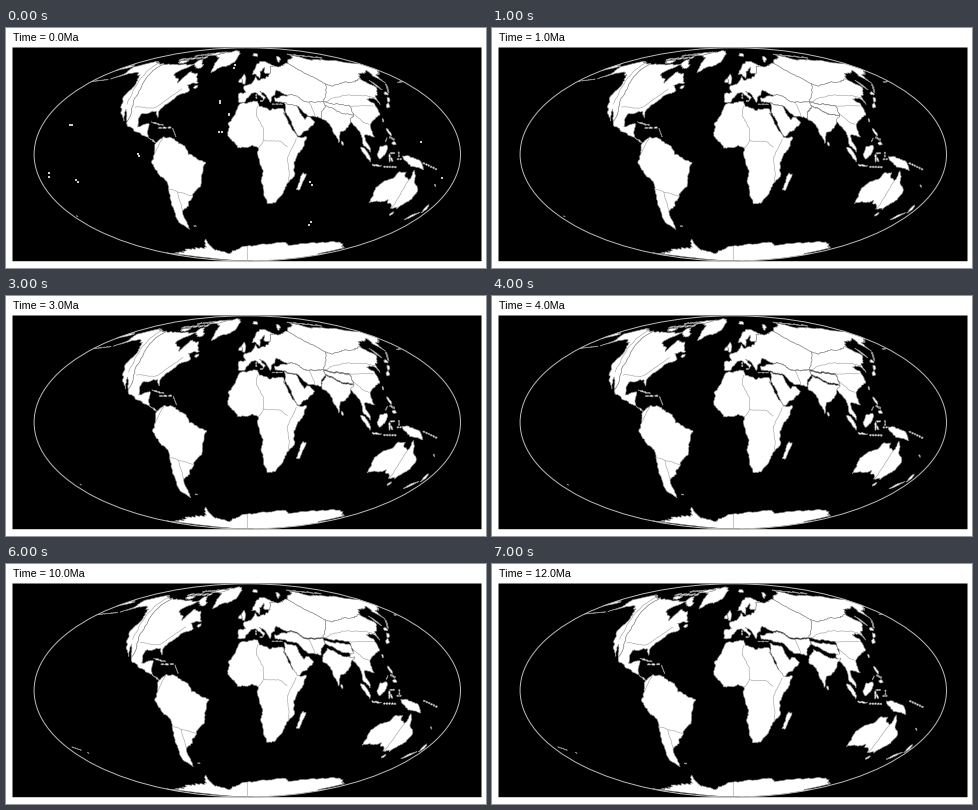
These frames come from a looping animation (480 by 240 pixels, 8000 ms). A matplotlib script:

```python
import numpy as np
import matplotlib.pyplot as plt
from matplotlib.animation import FuncAnimation
from matplotlib.collections import LineCollection, PolyCollection
from matplotlib.patches import Ellipse, Rectangle

AGES = [0, 1, 2, 3, 4, 5, 10, 12]
CX, CY, RX, RY = 241.3, 126.4, 213.2, 106.6
rng = np.random.default_rng(4)

# Plate motion: reference lon, lat, then drift east and north (deg/Ma)
NAM = (-95, 45, -0.40, 0.02)
GRN = (-42, 72, -0.12, 0.02)
CAR = (-75, 18, -0.20, 0.03)
SAM = (-60, -15, -0.27, 0.10)
AFR = (20, 5, 0.02, 0.20)
ARA = (45, 23, 0.13, 0.28)
EUR = (60, 50, 0.03, 0.0)
IRN = (50, 36, 0.04, 0.08)
TIB = (86, 32, 0.06, 0.20)
IND = (78, 20, 0.08, 0.50)
SEA = (112, 0, 0.02, 0.05)
PHI = (123, 12, -0.05, 0.12)
AUS = (134, -25, 0.10, 0.52)
ZEA = (170, -44, -0.10, 0.25)
PAC = (-176, -44, -0.75, 0.10)
FIX = (0, 0, 0, 0)

theta = np.linspace(-np.pi / 2, np.pi / 2, 4001)
theta_lat = np.degrees(np.arcsin(np.clip((2 * theta + np.sin(2 * theta)) / np.pi, -1, 1)))


def sphere(lon, lat):
    lon, lat = np.radians(lon), np.radians(lat)
    return np.stack([np.cos(lat) * np.cos(lon), np.cos(lat) * np.sin(lon), np.sin(lat)], -1)


def spin_vector(plate):
    lon, lat, east, north = plate
    r = sphere(lon, lat)
    e = sphere(lon + 90, 0)
    return np.cross(r, east * e + north * np.cross(r, e))


def reconstruct(pts, plate, age):
    """Rotate lon/lat points back in time, keeping longitudes continuous."""
    p = sphere(pts[:, 0], pts[:, 1])
    w = -np.radians(spin_vector(plate)) * age
    ang = np.linalg.norm(w)
    if ang > 0:
        k = w / ang
        p = (p * np.cos(ang) + np.cross(k, p) * np.sin(ang)
             + np.outer(p @ k, k) * (1 - np.cos(ang)))
    lon = np.unwrap(np.degrees(np.arctan2(p[:, 1], p[:, 0])), period=360)
    lon -= 360 * np.round(lon.mean() / 360)
    return lon, np.degrees(np.arcsin(np.clip(p[:, 2], -1, 1)))


def mollweide(lon, lat):
    t = np.interp(lat, theta_lat, theta)
    return np.column_stack([CX + RX * lon / 180 * np.cos(t), CY - RY * np.sin(t)])


def project(pts, plate, age):
    """Map outline, with a second copy for what crosses the date line."""
    lon, lat = reconstruct(pts, plate, age)
    out = [mollweide(lon, lat)]
    for turn in (-360, 360):
        if lon.min() < turn + 180 and lon.max() > turn - 180:
            out.append(mollweide(lon - turn, lat))
    return out


def roughen(pts, levels, amp):
    """Midpoint displacement that depends on place only, so shared edges agree."""
    for _ in range(levels):
        a, b = pts[:-1], pts[1:]
        mid = (a + b) / 2
        size = np.minimum(np.hypot(*(b - a).T), 5) * amp
        x, y = mid.T
        mid = mid + np.column_stack([np.sin(9.1 * x + 5.7 * y), np.sin(7.3 * x - 8.3 * y)]) * size[:, None]
        full = np.empty((len(pts) + len(mid), 2))
        full[::2], full[1::2] = pts, mid
        pts = full
    pts[:, 1] = np.clip(pts[:, 1], -89.9, 89.9)
    return pts


lands, seams = [], []


def land(plate, *coast, since=0, levels=4):
    pts = np.reshape(coast, (-1, 2)).astype(float)
    lands.append((roughen(np.vstack([pts, pts[:1]]), levels, 0.14), plate, since))


def seam(plate, *line):
    seams.append((roughen(np.reshape(line, (-1, 2)).astype(float), 3, 0.08), plate))


def isles(plate, lon0, lat0, lon1, lat1, width, n=1, since=0):
    """A chain of n ragged islands between two points."""
    squash = np.array([np.cos(np.radians((lat0 + lat1) / 2)), 1])
    start, end = np.array([lon0, lat0]) * squash, np.array([lon1, lat1]) * squash
    step = (end - start) / n
    along = step / np.hypot(*step)
    across = np.array([-along[1], along[0]])
    t = np.linspace(0, 2 * np.pi, 10, endpoint=False)
    for k in range(n):
        r = rng.uniform(0.75, 1.2, (10, 1))
        ring = (np.outer(np.cos(t), step * (0.5 if n == 1 else 0.4))
                + np.outer(np.sin(t), across * width)) * r
        land(plate, *((start + step * (k + 0.5) + ring) / squash).ravel(), since=since, levels=2)


# Eurasia
land(EUR, -9, 37, -9, 43, -1.5, 44, -4, 48.5, 8, 54, 10, 57, 12, 54, 21, 55, 30, 60, 34, 66,
     44, 66, 66, 69, 80, 57, 88, 51, 74, 37, 54, 38, 48, 42, 41, 42, 31, 46, 28, 42, 24, 40,
     22.5, 36.5, 19, 42, 13, 45, 18, 40, 16, 38, 9, 44, 3, 42, -2, 37)
land(EUR, 30, 60, 22, 60.5, 25, 65.5, 17, 61.5, 15, 55.5, 11, 59, 6, 59, 15, 68.5, 27, 71, 41, 67, 34, 66)
land(EUR, 66, 69, 72, 72, 104, 77.5, 113, 73.5, 140, 72.5, 180, 69, 190, 66, 170, 60, 162, 58,
     157, 51.5, 156, 57.5, 163, 62, 143, 59, 135, 54.7, 97, 50, 88, 51, 80, 57)
land(EUR, 88, 51, 97, 50, 135, 54.7, 140, 48, 128, 39.5, 127, 35, 125, 39.5, 118, 39, 122, 36,
     121, 28, 108, 20.5, 109, 12, 100.5, 13, 104, 1.5, 98, 8, 97, 16, 91.5, 22.5, 97, 28,
     97, 34, 74, 37)
land(IRN, 27, 37, 36, 36.5, 46, 34.5, 55, 26.7, 66.5, 25, 74, 34.5, 74, 37, 54, 38, 48, 42,
     41, 42, 36, 41.5, 27, 40)
land(TIB, 74, 37, 74, 34.5, 86, 28.5, 97, 28, 97, 34)
land(IND, 66.5, 25, 72.5, 21, 77.5, 8, 80, 15, 91.5, 22.5, 97, 28, 86, 28.5, 74, 34.5)
land(ARA, 36, 36.5, 35, 29.5, 43.5, 12.7, 52.5, 16.5, 59.8, 22.5, 56, 26, 51.5, 24.2, 48, 30, 46, 34.5)
seam(EUR, 74, 37, 97, 42, 120, 42, 128, 40)
seam(EUR, 97, 34, 107, 34, 120, 34)
seam(EUR, 97, 28, 102, 23, 107, 20.5)
seam(IRN, 61, 26, 60, 37)

# Africa
land(AFR, -6, 35.8, 10, 37.3, 11, 34, 20, 31, 34, 31.2, 34.5, 28, 33, 29, 37, 20.5, 43, 12,
     51, 11.8, 42, -1, 39.5, -5, 40.5, -15, 35, -20, 32.5, -27, 27, -33.5, 19, -34.5, 12, -18,
     13.5, -11, 9, -1, 9.5, 4, 4, 6.3, -8, 4.4, -16.8, 13, -17, 21.5)
seam(AFR, 10, 34, 8, 27, 14, 18, 14, 10, 9, 4.5)
seam(AFR, 14, 10, 28, 9, 34, 5)
seam(AFR, 42, 11, 34, -2, 36, -19)

# The Americas
land(NAM, -168, 65.5, -157, 71.3, -135, 69, -114, 47, -106, 28, -105.5, 20, -113, 31.5,
     -109.6, 23, -124, 40, -124, 48.5, -136, 58.5, -148, 60.5, -163, 54.8, -158, 59)
land(NAM, -135, 69, -95, 68, -82, 69, -94, 60, -82, 55, -79, 51.5, -77, 61, -65, 60, -56, 52,
     -67, 50, -61, 46, -70, 42, -76, 36, -81, 31.5, -80.5, 25.5, -84, 30, -97, 28, -96, 19,
     -87, 21.4, -84, 11, -78, 8, -86, 12, -105.5, 20, -106, 28, -114, 47)
land(GRN, -73, 78, -56, 75, -48, 60.5, -40, 65, -22, 70, -18, 80, -30, 83.5, -60, 82)
land(SAM, -77.5, 8, -72, 12, -62, 10.5, -51, 3, -50, 0, -35.2, -5.5, -39, -13.5, -41, -22,
     -48.5, -27, -57, -36.5, -65, -41, -66, -48, -68.5, -54.5, -75, -49, -71.5, -32,
     -70.3, -18.5, -76, -14, -81, -5, -78.5, 2)
seam(NAM, -146, 70, -130, 58, -118, 43, -115, 35)
seam(NAM, -106, 33, -86, 33, -70, 47)
seam(SAM, -70.5, -24, -50, -29)
seam(SAM, -63, -26, -64, -40)
seam(SAM, -72, 11, -78, 1)

# Australia and Antarctica
land(AUS, 114, -23, 115.5, -34, 124, -33, 131, -31.5, 140, -38, 147, -38.5, 153, -31,
     153, -25.5, 146, -19, 142.5, -10.8, 140.5, -17.5, 136, -15, 136, -12, 131, -12, 122.5, -17.5)
land(AUS, 131, -1, 138, -2, 147.5, -6, 150.5, -10.4, 138.5, -8, 133, -4)
seam(AUS, 140.5, -17.5, 139, -26, 141, -38)
land(FIX, -180, -78, -150, -77, -105, -73, -70, -71, -58, -63.3, -62, -74, -40, -78, -12, -71.5,
     50, -66.5, 70, -69, 135, -66, 170, -71.5, 163, -77.5, 180, -78,
     180, -89.9, 90, -89.9, 0, -89.9, -90, -89.9)
seam(FIX, 0, -70, 0, -89.8)

# Islands of the north
isles(EUR, -4, 50.3, -4, 58.5, 1.4)
isles(EUR, -8, 51.8, -7.5, 55.2, 1.2)
isles(EUR, 14, 77, 24, 80, 1.2)
isles(EUR, 53, 71, 66, 76.5, 0.8)
isles(EUR, 96, 79, 150, 75, 0.7, 5)
isles(NAM, -117, 71, -101, 71, 1.6)
isles(NAM, -87, 73, -65, 63.5, 2)
isles(NAM, -86, 77, -68, 82.5, 1.8)
isles(NAM, -125, 73, -81, 75.5, 1.1, 5)
isles(NAM, -115, 77, -88, 80, 0.9, 4)
isles(NAM, -58.5, 47.8, -54, 49, 1.2)
isles(NAM, -165, 54.5, -188, 52, 0.3, 9)

# Mediterranean, Caribbean and southern islands
isles(EUR, 9, 39, 9.2, 43, 0.5, 2)
isles(EUR, 12.5, 37.7, 15.5, 37.5, 0.5)
isles(IRN, 23, 35.3, 34, 35.2, 0.3, 3)
isles(CAR, -84.5, 22.3, -74.5, 20.2, 0.6)
isles(CAR, -78, 18.2, -66, 18.5, 0.6, 3)
isles(CAR, -65, 18, -61, 12, 0.25, 6)
isles(SAM, -61, -51.8, -58, -51.8, 0.4, 2)
isles(AFR, 49.3, -12.5, 44.8, -25.3, 1.9)
isles(IND, 80.3, 9.3, 81, 6.2, 0.9)

# East Asia and the Pacific rim
isles(EUR, 142.5, 46, 143, 54, 0.7)
isles(EUR, 131, 32, 141.5, 41, 0.9, 2)
isles(EUR, 140.5, 42.5, 145, 44, 1)
isles(EUR, 146, 44, 156, 51, 0.4, 6)
isles(EUR, 120.5, 22.3, 121.5, 25, 0.6)
isles(PHI, 120.7, 18.3, 123.5, 13, 0.9)
isles(PHI, 121.5, 12, 125.5, 10, 0.8, 4)
isles(PHI, 122.5, 7.7, 126.3, 7.5, 1.1)
isles(PHI, 117.3, 8.5, 119.5, 11.5, 0.3)
isles(PHI, 127.8, 2, 128, -2, 0.5, 2)
isles(SEA, 95.5, 5.5, 105.5, -5.5, 1.5)
isles(SEA, 105.5, -6.8, 114.3, -8.2, 0.7)
isles(SEA, 110.3, -2, 117.5, 6, 3)
isles(SEA, 120.2, -5.3, 120.2, 1, 0.7)
isles(SEA, 120.5, 0.8, 125, 1, 0.5)
isles(SEA, 121, -2, 123, -4.8, 0.7)
isles(SEA, 115.5, -8.5, 127, -8.7, 0.6, 5)
isles(SEA, 126.3, -3.3, 130.6, -3.2, 0.5, 2)
isles(PHI, 148.5, -5.7, 162, -10.5, 0.6, 6)
isles(AUS, 164.3, -20.3, 166.8, -22.2, 0.3)
isles(AUS, 146, -40.7, 147.3, -43.4, 1.1)
isles(ZEA, 173.5, -34.8, 176, -41.3, 1)
isles(ZEA, 173.3, -41, 167.3, -46.3, 1.1)
isles(PAC, -176.8, -44, -176, -44, 0.4)
isles(FIX, -175, -40, -169, -42.5, 0.4, 4, since=10)

# Young volcanic islands: hot spots, each with a few scattered islets
hot_spots = np.array([(-156, 20), (-91, 0), (-24, 15), (56, -21), (-171, -14), (-149, -17),
                      (69, -49), (-27, 38), (-15, 28), (168, -17), (-19, 65), (148, 9)])
islets = np.repeat(hot_spots, 2, axis=0) + rng.normal(0, 1, (2 * len(hot_spots), 2))

fig = plt.figure(figsize=(4.8, 2.4), dpi=100, facecolor="white")
ax = fig.add_axes([0, 0, 1, 1])
ax.set(xlim=(0, 480), ylim=(240, 0))
ax.axis("off")
ax.add_patch(Rectangle((6.5, 19.5), 469, 213.7, color="black", lw=0, snap=False))
globe = Ellipse((CX, CY), 2 * RX, 2 * RY, fc="none", ec="0.72", lw=0.72, zorder=5)
ax.add_patch(globe)

land_art = PolyCollection([], facecolors="white", edgecolors="0.55", linewidths=0.4, zorder=2)
seam_art = LineCollection([], colors="0.6", linewidths=0.4, zorder=3)
for art in (land_art, seam_art):
    ax.add_collection(art, autolim=False)
    art.set_clip_path(globe)
islet_art = ax.scatter(*mollweide(*islets.T).T, s=0.6, marker="s", c="0.8", lw=0, zorder=4)
label = ax.text(6.7, 13.3, "", family="Liberation Sans", size=7.75, color="black", va="baseline")


def update(i):
    age = AGES[i]
    land_art.set_verts([v for pts, plate, since in lands if age >= since
                        for v in project(pts, plate, age)])
    seam_art.set_segments([v for pts, plate in seams for v in project(pts, plate, age)])
    islet_art.set_visible(age == 0)
    label.set_text(f"Time = {age:.1f}Ma")
    return land_art, seam_art, islet_art, label


anim = FuncAnimation(fig, update, frames=len(AGES), interval=1000, repeat=True, repeat_delay=0)
plt.show()
```
